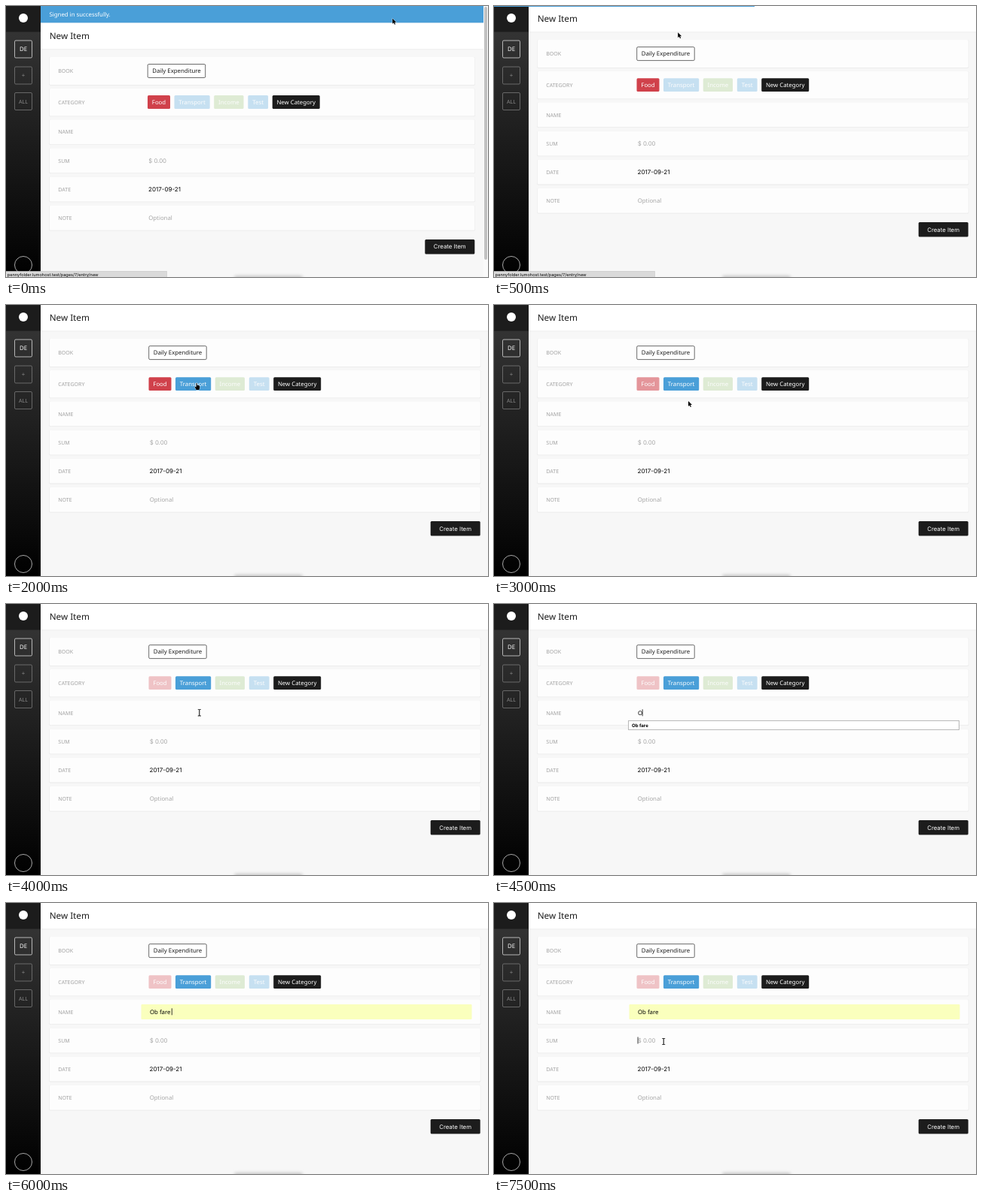
Write an HTML page that moves like this. It is 640 by 361 pixels and loops after 8 s.

```html
<!DOCTYPE html>
<html lang="en">
<head>
<meta charset="utf-8">
<title>New item form</title>
<style>
html, body { margin: 0; width: 100%; height: 100%; overflow: hidden; background: #f7f7f7; }
svg { display: block; width: 640px; height: 361px; }
text { font: 7.8px "Noto Sans", "Open Sans", sans-serif; white-space: pre; text-rendering: geometricPrecision; }
.mid { text-anchor: middle; }
.ui { font-family: Inter, Roboto, sans-serif; }
.label { font-size: 7px; fill: #a2a2a2; }
.hint { fill: #a6a6a6; }
.white { fill: #fff; }
.line { fill: none; stroke: #fff; stroke-width: .65; }
.dim .line { stroke: #8c8c8c; }
.dim text { fill: #8a8a8a; }
.dark { fill: #1c1c1c; }
.cursor { stroke: #fff; stroke-width: .7; stroke-linejoin: round; paint-order: stroke; }
</style>
</head>
<body>
<svg viewBox="0 0 640 361">
  <defs>
    <linearGradient id="side" x2="0" y2="1">
      <stop offset=".1" stop-color="#333"/>
      <stop offset="1" stop-color="#000"/>
    </linearGradient>
    <filter id="soft" x="-20%" y="-200%" width="140%" height="500%"><feGaussianBlur stdDeviation="2.2"/></filter>
  </defs>
  <rect width="640" height="361" fill="#f7f7f7"/>
  <rect x="303" y="359.5" width="91" height="6" rx="3" fill="#999" opacity=".55" filter="url(#soft)"/>

  <g id="page">
    <rect x="46" width="594" height="34.5" fill="#fff"/>
    <rect x="46" y="34.5" width="594" height=".8" fill="#ebebeb"/>
    <text x="57.7" y="21.2" style="font-size:11.7px" fill="#1c1c1c">New Item</text>
    <g id="cards"></g>
    <g id="fields">
      <rect x="189.7" y="54.6" width="76.5" height="18" rx="1.5" fill="#fff" stroke="#1c1c1c" stroke-width=".65"/>
      <text class="mid dark" x="228" y="66.4">Daily Expenditure</text>
      <g id="chips"></g>
      <rect id="filled" x="179.5" y="135" width="439" height="20" rx="1" fill="#faffbd"/>
      <text id="name" x="191" y="147.8"></text>
      <text class="hint ui" x="190.7" y="185.9">$ 0.00</text>
      <text class="ui" x="190.5" y="224.1" style="font-size:8px">2017-09-21</text>
      <text class="hint" x="190.7" y="262.3">Optional</text>
      <g id="menu">
        <rect x="178.5" y="155.5" width="439" height="12" fill="#fff" stroke="#b9b9b9"/>
        <text class="ui" x="183" y="163.9" style="font-size:6.1px;font-weight:700">Ob fare</text>
      </g>
    </g>
    <g id="create">
      <rect class="dark" x="563.7" y="288" width="66" height="19.6" rx="1.5"/>
      <text class="mid white ui" x="596.6" y="300.5">Create Item</text>
    </g>
  </g>

  <g id="notice">
    <rect x="46" width="588" height="22.3" fill="#4a9fd8"/>
    <text class="white" x="57.5" y="13.8">Signed in successfully.</text>
    <rect x="634" width="6" height="361" fill="#fafafa"/>
    <rect x="635" y="1" width="4" height="337" rx="2" fill="#c1c1c1"/>
  </g>

  <rect width="46" height="361" fill="url(#side)"/>
  <rect class="dark" width="46" height="34.5"/>
  <circle class="white" cx="23" cy="16" r="6"/>
  <g id="nav"></g>
  <circle class="line" cx="23" cy="345" r="11.5"/>

  <rect id="progress" width="346" height="1" fill="#4a9fd8"/>
  <g id="status">
    <rect x="-1" y="353.4" width="214.3" height="9" fill="#dadada" stroke="#c4c4c4" stroke-width=".6"/>
    <text class="ui" x="1.8" y="359.7" style="font-size:5.6px">pennyfolder.lumohost.test/pages/7/entry/new</text>
  </g>
  <rect id="caret" width=".9" height="9" fill="#222"/>
  <g class="cursor">
    <path id="arrow" d="M0 0V7L1.6 5.5L2.8 8L3.9 7.5L2.8 5H5Z"/>
    <path id="hand" d="M-1.4 -4.5Q-.6 -5 -.3 -4.2V-1.8Q1.4 -2 3 -1Q3.6 1.6 2.4 4.4H-1.4Q-2.4 2.2 -3.4 .4Q-3 -.6 -1.4 .8Z"/>
    <path id="beam" d="M-2 -4.6H-.5L0 -4.2L.5 -4.6H2V-3.8H.5V3.8H2V4.6H.5L0 4.2L-.5 4.6H-2V3.8H-.5V-3.8H-2Z"/>
  </g>
</svg>
<script>
const el = id => document.getElementById(id);
const show = (id, on) => el(id).setAttribute('display', on ? 'inline' : 'none');
const move = (id, x, y) => el(id).setAttribute('transform', `translate(${x} ${y})`);

const cards = [
  ['BOOK', 45, 37], ['CATEGORY', 87, 36.5], ['NAME', 128.3, 33],
  ['SUM', 166.4, 33], ['DATE', 204.6, 33], ['NOTE', 242.8, 33]
];
el('cards').innerHTML = cards.map(([label, y, h]) => `
  <rect class="card" x="57.3" y="${y}" width="573" height="${h + .8}" rx="1.5" fill="#e9e9e9"/>
  <rect class="card" x="57.8" y="${y}" width="572" height="${h}" rx="1.5" fill="#fdfdfd"/>
  <text class="label" x="69.3" y="${y + h / 2 + 2.8}">${label}</text>`).join('');

const chips = [
  ['Food', 189.5, 30, '#d0414b'], ['Transport', 225, 47.2, '#4a9fd8'],
  ['Income', 277.7, 39.3, '#98c379'], ['Test', 322.8, 26.8, '#4a9fd8'],
  ['New Category', 355.2, 63, '#1c1c1c']
];
el('chips').innerHTML = chips.map(([label, x, w, color]) => `
  <g class="chip"><rect x="${x}" y="96.2" width="${w}" height="17.8" rx="1.5" fill="${color}"/>
  <text class="mid white" x="${x + w / 2}" y="108.1">${label}</text></g>`).join('');

el('nav').innerHTML = [['DE', 46], ['+', 81], ['ALL', 115.5]].map(([label, y], i) => `
  <g class="${i ? 'dim' : ''}"><rect class="line" x="11.5" y="${y}" width="23" height="23" rx="1.5"/>
  <text class="mid white" x="23" y="${y + 14.3}" ${i == 2 ? 'style="font-size:7px"' : ''}>${label}</text></g>`).join('');

// one pointer pose per half second; null while typing hides it
const pointer = [
  ['arrow', 513.2, 16.7], ['arrow', 244.2, 35.3], ['hand', 231, 56.7], ['hand', 256, 61.7],
  ['hand', 254, 108.7], ['hand', 253, 112.5], ['arrow', 258, 128], ['beam', 263.5, 144.5],
  ['beam', 256.8, 144.8], null, null, null, null,
  ['arrow', 238.5, 156], ['beam', 224.5, 178.5], ['beam', 225.2, 184.5]
];
// caret position by step; missing means blinked off
const carets = { 9: [196.7, 140.3], 11: [196.7, 140.3], 12: [219.8, 140.3], 14: [219.8, 140.3], 15: [190.6, 178.5] };

function draw(step) {
  const first = step === 0;
  show('notice', first);
  show('progress', step === 1);
  show('status', step < 2);
  move('page', 0, first ? 22.9 : 0);
  move('fields', first ? -1.5 : 0, 0);
  move('create', first ? -7.4 : 0, 0);
  document.querySelectorAll('.card').forEach((c, i) =>
    c.setAttribute('width', (i % 2 ? 572 : 573) - (first ? 7.5 : 0)));

  const food = step < 6 ? 1 : step === 6 ? .55 : .3;
  const alpha = [food, step < 4 ? .3 : 1, .3, .3, 1];
  document.querySelectorAll('.chip').forEach((c, i) => c.setAttribute('opacity', alpha[i]));

  show('menu', step > 8 && step < 12);
  show('filled', step > 11);
  el('name').textContent = step < 9 ? '' : step < 12 ? 'O' : 'Ob fare';

  const caret = carets[step];
  show('caret', caret);
  if (caret) move('caret', ...caret);
  const pose = pointer[step];
  for (const kind of ['arrow', 'hand', 'beam']) show(kind, pose && pose[0] === kind);
  if (pose) move(...pose);
}

const start = performance.now();
let last = -1;
function tick() {
  const step = Math.floor((performance.now() - start) % 8000 / 500);
  if (step !== last) draw(last = step);
  requestAnimationFrame(tick);
}
tick();
</script>
</body>
</html>
```
